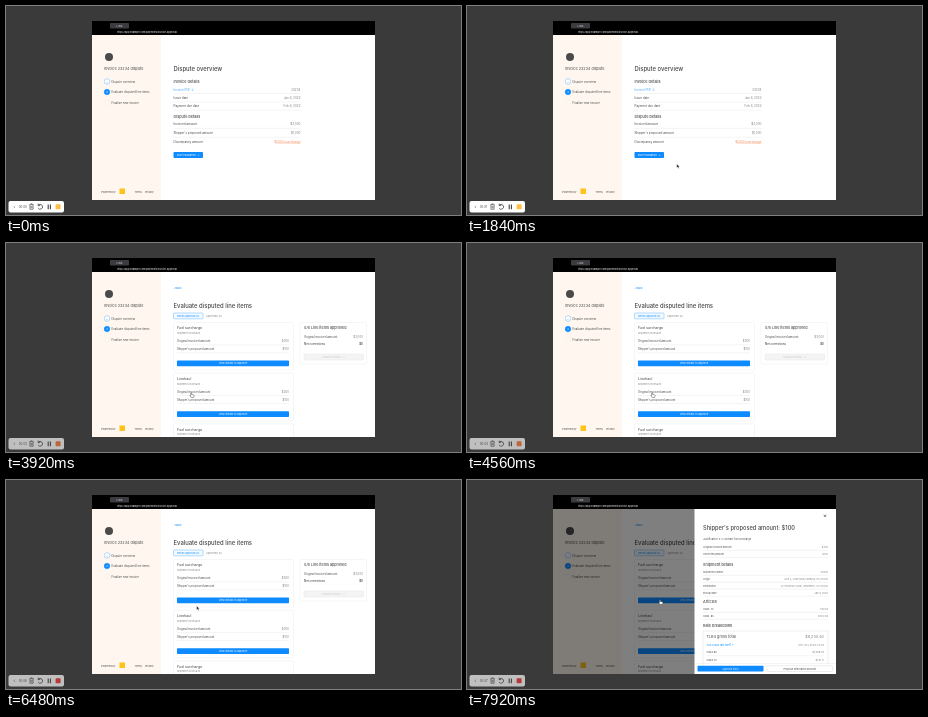
An HTML page for the animation above (8 s loop, 455 by 209 pixels).

```html
<!DOCTYPE html>
<html lang="en">
<head>
<meta charset="utf-8">
<style>
  html, body { margin: 0; width: 100%; height: 100%; overflow: hidden; background: #3a3a3a; }
  svg { display: block; width: 100vw; height: 100vh; font-family: Inter, sans-serif; }
</style>
</head>
<body>
<svg id="stage" viewBox="0 0 455 209"></svg>
<script>
const BLUE = '#0d8bff', INK = '#484848', GREY = '#808080';

const text = (x, y, str, size = 3, fill = INK, anchor = 'start', weight = 400) =>
  `<text x="${x}" y="${y}" font-size="${size}" fill="${fill}" text-anchor="${anchor}" font-weight="${weight}">${str}</text>`;
const rect = (x, y, w, h, fill, r = 0, stroke = 'none') =>
  `<rect x="${x}" y="${y}" width="${w}" height="${h}" rx="${r}" fill="${fill}" stroke="${stroke}" stroke-width=".5"/>`;
const path = (d, stroke, width = .6, fill = 'none') =>
  `<path d="${d}" stroke="${stroke}" stroke-width="${width}" fill="${fill}"/>`;
const circle = (x, y, r, fill, stroke = 'none') =>
  `<circle cx="${x}" cy="${y}" r="${r}" fill="${fill}" stroke="${stroke}" stroke-width=".5"/>`;
const group = (id, body) => `<g id="${id}">${body}</g>`;
const rule = (x1, x2, y) => path(`M${x1} ${y}H${x2}`, '#e4e4e4', .4);
const row = (x1, x2, y, label, value, size = 3) =>
  text(x1, y, label, size) + text(x2, y, value, size, GREY, 'end');
const button = (x, y, w, h, label, size = 2.6) =>
  rect(x, y, w, h, BLUE, .7) + text(x + w / 2, y + h / 2 + .9, label, size, '#fff', 'middle');

function shell() {
  const step = (y, n, label, fill, stroke, ink) =>
    circle(101, y, 2.8, fill, stroke) + text(101, y + 1, n, 2.7, ink, 'middle') + text(105.5, y + 1.1, label, 2.9);
  return rect(86, 15, 283, 179, '#000') + rect(104, 17, 19, 5.6, '#3b3b40', .8)
    + text(113.5, 20.6, 'LINK', 2.6, '#ddd', 'middle')
    + text(111, 27, 'https://app.example.com/payments/invoice-approval', 2.4, '#fff')
    + rect(86, 29, 69, 165, '#fff7ef') + rect(155, 29, 214, 165, '#fff')
    + circle(103, 51, 4, '#4a4a4a')
    + text(98, 64.4, 'Invoice 23234 dispute', 3.75)
    + step(75.5, '✓', 'Dispute overview', '#fff', '#66b5ff', BLUE)
    + step(86, '2', 'Evaluate disputed line items', BLUE, BLUE, '#fff')
    + step(96.5, '', 'Finalize new invoice', '#fff7ef', '#f5eee7', '#aaa')
    + text(95, 186.5, 'Powered by', 2.6) + rect(113.5, 182.5, 5.5, 5.5, '#ffc21a')
    + text(128.5, 186.5, 'Terms', 2.5) + text(139, 186.5, 'Privacy', 2.5);
}

function overview() {
  const line = (y, label, value) => row(167.5, 294.5, y, label, value) + rule(167.5, 294.5, y + 3);
  return text(167.5, 65.4, 'Dispute overview', 5.9, INK, 'start', 500)
    + text(167.5, 76.8, 'Invoice details', 3.8, INK, 'start', 500)
    + text(167.5, 84.7, 'Invoice PDF ↓', 3, '#42a5ff') + text(294.5, 84.7, '23234', 3, GREY, 'end')
    + rule(167.5, 294.5, 87.5)
    + line(93, 'Issue date', 'Jan 6, 2022') + line(101.2, 'Payment due date', 'Feb 6, 2022')
    + text(167.5, 111.7, 'Dispute details', 3.8, INK, 'start', 500)
    + line(119.4, 'Invoiced amount', '$3,000') + line(128.2, "Shipper's proposed amount", '$1,000')
    + text(167.5, 137, 'Discrepancy amount') + text(294.5, 136.5, '$2000 overcharge', 3, '#f39064', 'end')
    + path('M270 137.2H294.5', '#f39064', .4)
    + button(167.5, 146, 29.5, 6, 'Start evaluation &#160;→');
}

function lineItems() {
  const card = (y, title) => rect(167.5, y, 120, 47.5, '#fff', 1, '#ececec')
    + text(171, y + 6.6, title, 3.6) + text(171, y + 11.4, 'Shipment 20345678', 2.4, GREY)
    + row(171, 283, y + 19.5, 'Original invoiced amount', '$300', 2.85) + rule(171, 283, y + 22.4)
    + row(171, 283, y + 27.6, "Shipper's proposed amount", '$100', 2.85) + rule(171, 283, y + 30.3)
    + button(171, y + 38, 112, 5.8, 'View details to approve');
  return text(167.5, 46.2, '‹ Back', 2.7, BLUE)
    + text(167.5, 65.4, 'Evaluate disputed line items', 5.9, INK, 'start', 500)
    + rect(167.5, 70, 29.5, 5.8, '#f4faff', .6, '#66b5ff') + text(182.2, 73.8, 'Needs approval (2)', 2.5, BLUE, 'middle')
    + text(200, 73.8, 'Approved (0)', 2.6, GREY)
    + card(79.5, 'Fuel surcharge') + card(130.2, 'Linehaul')
    + `<g clip-path="url(#page)">${card(180.9, 'Fuel surcharge')}</g>`
    + rect(294, 79.5, 66.5, 41.5, '#fff', 1, '#ececec')
    + text(298, 86.2, '0/5 Line items approved', 3.7, INK, 'start', 500)
    + row(298, 357, 94.6, 'Original invoiced amount', '$3,000', 2.85)
    + text(298, 101.8, 'Net corrections', 2.85, INK, 'start', 500) + text(357, 101.8, '$0', 2.85, INK, 'end', 600)
    + rect(298, 111, 59.5, 6, '#f4f4f4', .7, '#e6e6e6') + text(327.7, 114.9, 'Finalize invoice &#160;→', 2.6, '#c8c8c8', 'middle');
}

function drawer() {
  const line = (y, label, value) => row(236, 361, y, label, value, 2.45) + rule(236, 361, y + 2.4);
  const head = (y, label) => text(236, y, label, 3.8, INK, 'start', 500);
  return rect(86, 29, 283, 165, 'rgba(0,0,0,.5)') + rect(227.5, 29, 141.5, 165, '#fff')
    + path('M356.8 34.6l2.4 2.4m0-2.4l-2.4 2.4', '#333')
    + text(236, 50.4, "Shipper's proposed amount: $100", 5.7, INK, 'start', 500)
    + text(236, 59.9, 'Justification: 2% contract fuel surcharge', 2.5)
    + line(68, 'Original invoiced amount', '$300') + line(75, 'Corrected amount', '$100')
    + head(86.4, 'Shipment details')
    + line(93, 'Shipment number', '20345') + line(100, 'Origin', 'Unit 4, Alder Row, Fairwick, PA 00000')
    + line(106.7, 'Destination', '8 Thornbury Lane, Westmere, CA 00000') + line(113.8, 'Pickup date', 'Jan 3, 2022')
    + head(123.2, 'Articles') + line(130, 'Class: 70', '145 lbs') + line(137, 'Class: 85', '2000 lbs')
    + head(146.6, 'Rate breakdown')
    + path('M236 184V151H361V184', '#dedede', .5)
    + row(239.5, 357, 158, 'TLR4 gross total', '$8,230.40', 3.8)
    + text(239.5, 166, 'TLR4 base rate tariff ↗', 2.5, BLUE) + text(357, 166, 'LITE-001, 2022-01-03', 2.5, GREY, 'end')
    + row(239.5, 357, 173.3, 'Class 85', '$7,499.23', 2.5) + rule(239.5, 357, 175.8)
    + row(239.5, 357, 180.6, 'Class 70', '$731.17', 2.5) + rule(227.5, 369, 183.5)
    + button(230.5, 185.7, 66, 5.8, 'Approve $100', 2.5)
    + rect(300, 185.7, 65.5, 5.8, '#fff', .7, '#ddd') + text(332.7, 189.5, 'Propose alternative amount', 2.5, INK, 'middle');
}

function viewerControls() {
  return circle(6, 5, 1.5, 'none', '#999') + path('M6 6.5V8.5', '#999')
    + circle(18, 6, 1.9, 'none', '#aaa')
    + text(228, 7.3, 'Portfolio overview 2022 &#160;⌄', 3.6, '#aaa', 'middle')
    + circle(385, 6, 2.9, '#4b7eaa') + text(385, 7, 'C', 2.8, '#222', 'middle')
    + rect(392, 2.2, 28, 7.6, '#1683d8', 1.2) + text(406, 7, 'Share prototype', 2.9, '#16354f', 'middle')
    + text(426, 7.2, 'Options ⌄', 3.2, '#aaa') + path('M446 7.5l3-3m-2 0h2v2', '#aaa')
    + rect(214, 199, 27, 8, '#202020', 1.5) + text(227.5, 204, '‹ &#160; 12 / 40 &#160; ›', 2.9, '#bbb', 'middle')
    + rect(425.5, 199, 26.5, 8, '#202020', 1.5) + text(438.7, 204, '↺ Restart', 2.9, '#bbb', 'middle');
}

function recorder() {
  return rect(2.5, 195, 55.5, 11.6, '#fff', 2)
    + path('M9 199.6L7.8 200.8L9 202', '#555', .5)
    + `<text id="clock" x="12.8" y="201.9" font-size="2.9" fill="#444"></text>`
    + path('M23.2 198.7H27.8M24.8 198.6V197.8H26.2V198.6M23.9 199V203.3H27.1V199M25 200V202.3M26 200V202.3', '#444')
    + path('M32.3 199.3A2.4 2.4 0 1 1 32.1 202M32.2 197.6V199.6H34.2', '#444', .8)
    + path('M42.2 198.5V203.2M44.4 198.5V203.2', '#444', 1.1)
    + '<rect id="stop" x="49.6" y="198.3" width="5" height="5" rx=".8"/>';
}

const stage = document.getElementById('stage');
stage.innerHTML = '<clipPath id="page"><path d="M86 29H369V194H86Z"/></clipPath>'
  + rect(0, 0, 455, 209, '#3a3a3a') + shell()
  + group('overview', overview()) + group('items', lineItems()) + group('drawer', drawer())
  + group('controls', viewerControls()) + group('recorder', recorder())
  + group('cursor',
      group('arrow', path('M0 0V4L1 3.1L1.7 4.6L2.4 4.3L1.7 2.8H2.9Z', '#fff', .4, '#111'))
    + group('hand', path('M.2 .5Q.7 -.2 1.2 .5V2L3.3 2.4Q3.8 2.6 3.6 3.5L3 5H.9L-.7 3Q-.7 2.4 .2 3Z', '#222', .4, '#fff')));

const el = id => document.getElementById(id);
const show = (id, on) => el(id).setAttribute('visibility', on ? 'visible' : 'hidden');
const fade = (id, value) => el(id).setAttribute('opacity', value);
const ramp = (t, from, to) => Math.min(1, Math.max(0, (t - from) / (to - from)));
const ease = p => p * p * (3 - 2 * p);

// Cursor stops: [departure, arrival, x, y]
const moves = [[960, 1600, 209.8, 158], [1840, 2640, 184.5, 149.5], [5920, 6720, 192.3, 119.5]];

function draw(t) {
  let x = 232, y = 184;
  for (const [from, to, nx, ny] of moves) {
    const p = ease(ramp(t, from, to));
    x += (nx - x) * p;
    y += (ny - y) * p;
  }
  el('cursor').setAttribute('transform', `translate(${x} ${y})`);
  const hand = (t >= 2560 && t < 5040) || t >= 6640;
  show('arrow', t >= 960 && !hand);
  show('hand', hand);

  show('overview', t < 3680);
  show('items', t >= 3680);
  show('drawer', t >= 7920);
  fade('controls', ramp(t, 2720, 2960) * (1 - ramp(t, 3600, 3840)));
  fade('recorder', 1 - .32 * ramp(t, 3600, 3840));

  el('clock').textContent = '00:0' + Math.floor(t / 1000);
  const red = ramp(t, 3600, 3920) * .5 + ramp(t, 4640, 5040) * .5;
  el('stop').setAttribute('fill', `rgb(${255 - 15 * red}, ${190 - 135 * red}, ${65 - 10 * red})`);
}

const start = performance.now();
function tick() {
  draw((performance.now() - start) % 8000);
  requestAnimationFrame(tick);
}
tick();
</script>
</body>
</html>
```
